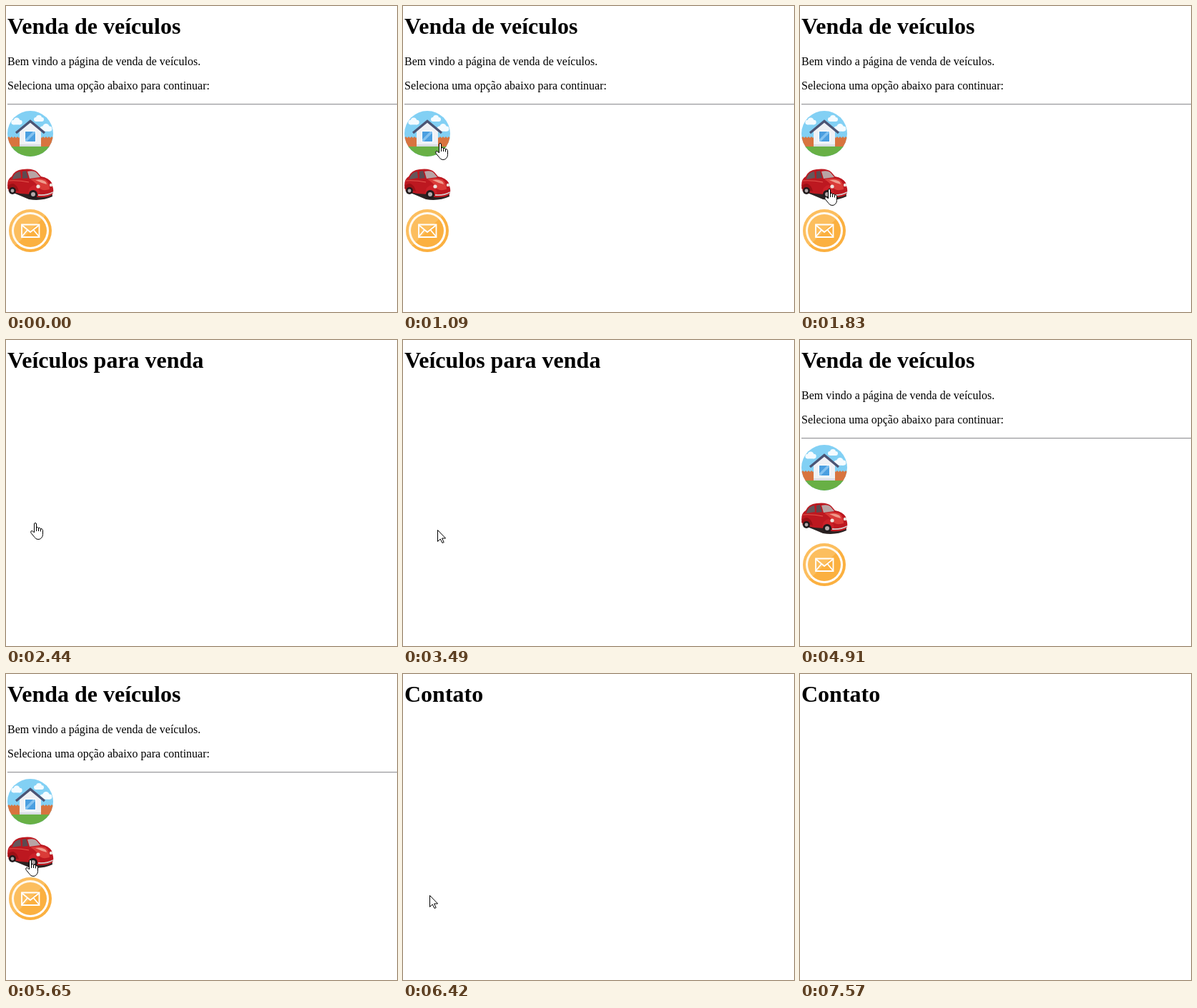
An HTML page with a canvas that plays this animation: 547x429 px, repeating every 8000 ms.

```html
<!DOCTYPE html>
<html lang="pt">
<head>
<meta charset="utf-8">
<title>Venda de veículos</title>
<style>
  html, body { margin: 0; width: 100%; height: 100%; overflow: hidden; background: #fff; }
  body { position: relative; color: #000; font-family: "Liberation Serif", "Times New Roman", serif; }
  canvas { position: absolute; left: 0; top: 0; }
  h1, p { position: absolute; left: 2px; margin: 0; white-space: nowrap; }
  h1 { top: 10px; font: bold 32px/36px "Liberation Serif", "Times New Roman", serif; }
  p { top: 69px; font-size: 16px; line-height: 17px; }
  p + p { top: 103px; }
</style>
</head>
<body>
<section id="home">
  <h1>Venda de veículos</h1>
  <p>Bem vindo a página de venda de veículos.</p>
  <p>Seleciona uma opção abaixo para continuar:</p>
</section>
<section id="cars" hidden><h1>Veículos para venda</h1></section>
<section id="contact" hidden><h1>Contato</h1></section>
<canvas id="stage" width="547" height="429"></canvas>
<script>
const LOOP = 8000;
const ctx = document.getElementById('stage').getContext('2d');
const pages = ['home', 'cars', 'contact'].map(id => document.getElementById(id));

// Pointer moves: start, end, number of steps, points the tip passes
const moves = [
  [390, 450, 2, [[325, 401], [322, 394]]],
  [600, 1370, 12, [[328, 392], [262, 340], [130, 240], [58, 191], [41, 222], [39, 258]]],
  [1440, 1440, 1, [[39, 260]]],
  [1700, 1830, 2, [[39, 258], [40, 256]]],
  [2700, 2830, 3, [[43, 261], [48, 270]]],
  [3490, 4110, 10, [[48, 266], [54, 220], [70, 110], [84, 20], [86, -30]]],
  [5110, 5850, 12, [[12, 0], [15, 75], [25, 185], [33, 266], [35, 303]]],
  [5920, 5990, 2, [[36, 306], [37, 309]]],
  [6420, 6420, 1, [[37, 310]]],
  [7020, 7570, 9, [[37, 306], [32, 250], [25, 140], [24, 30], [23, -30]]]
];

function shape(d, fill, stroke, width = 1) {
  const path = new Path2D(d);
  if (fill) { ctx.fillStyle = fill; ctx.fill(path); }
  if (stroke) { ctx.strokeStyle = stroke; ctx.lineWidth = width; ctx.stroke(path); }
}

function disc(x, y, r, fill) {
  ctx.beginPath();
  ctx.arc(x, y, r, 0, Math.PI * 2);
  ctx.fillStyle = fill;
  ctx.fill();
}

function box(x, y, w, h, fill) {
  ctx.fillStyle = fill;
  ctx.fillRect(x, y, w, h);
}

function cloud(x, y, s) {
  disc(x - 4 * s, y + s, 3 * s, '#f4fbff');
  disc(x, y - s, 4 * s, '#f4fbff');
  disc(x + 4 * s, y + s, 3 * s, '#f4fbff');
  box(x - 4 * s, y, 8 * s, 4 * s, '#f4fbff');
}

function drawHouse() {
  ctx.save();
  ctx.beginPath();
  ctx.arc(34, 179, 32, 0, Math.PI * 2);
  ctx.clip();
  box(2, 147, 64, 64, '#82d0f4');
  cloud(15, 162, 1.1);
  cloud(46, 158, 1);
  cloud(56, 171, 1.2);
  for (let x = 2; x < 66; x += 4) {
    shape(`M${x} 199V185l2-2 2 2v14z`, x % 8 ? '#d8743f' : '#c8643a');
  }
  box(2, 197, 64, 14, '#68b045');
  shape('M19 197V175L34 162 49 175V197Z', '#eff1f5');
  box(19, 194, 30, 3, '#d9dde5');
  shape('M14 178L34 161.5 54 178', null, '#4b5474', 3.4);
  box(26, 175, 16, 16, '#fff');
  box(27, 176, 14, 14, '#4b9fe0');
  shape('M27 187L38 176H41V178L29 190H27Z', '#83c2f0');
  ctx.restore();
}

function drawCar() {
  shape('M3 259Q18 265 32 271Q50 274 65 267L64 260 20 252Z', '#2b2222');
  shape('M2 252Q2 242 8 239Q12 230 23 229Q38 227 44 233L49 239Q60 241 64 248L66 256Q67 262 64 265Q57 269 44 268L34 264 20 263 4 260Z', '#bd1820');
  shape('M10 239Q13 233 20 232L21 241 9 243Z', '#66565a');
  shape('M23 232L28 231 31 241 23 242Z', '#5c4a50');
  shape('M30 232Q39 230 43 234L48 240Q40 241 33 242Z', '#b8a5a5');
  shape('M34 243Q46 240 55 243Q61 248 61 257Q51 260 46 255Q42 247 34 243Z', '#da3b38');
  shape('M41 244Q51 242 56 247L57 250Q49 248 41 244Z', '#f09b8d');
  shape('M4 245Q17 244 32 247', null, '#e4574f', 1.2);
  shape('M2 256Q3 249 10 249Q16 251 18 260Z', '#9c1016');
  shape('M31 263Q32 252 40 251Q46 253 48 264Z', '#cc2028');
  disc(9, 259, 5, '#211b1d');
  disc(9, 259, 2.4, '#b4aaab');
  disc(38, 264, 6, '#211b1d');
  disc(38, 264, 3, '#b4aaab');
  disc(45, 253, 2.6, '#eee5df');
  disc(63, 251, 2.2, '#eee5df');
  shape('M45 265Q57 266 66 261', null, '#d5cccc', 1.8);
}

function drawMail() {
  disc(34, 315, 30, '#fbb040');
  disc(34, 315, 26, '#fff');
  disc(34, 315, 23, '#fbb040');
  ctx.save();
  ctx.beginPath();
  ctx.arc(34, 315, 30, 0, Math.PI * 2);
  ctx.clip();
  shape('M4 285H64L4 345Z', 'rgba(255,230,185,.25)');
  ctx.restore();
  shape('M22 306.5H46.5V324H22Z', null, '#fff', 1.8);
  shape('M22 307L34 317 46.5 307M22 323.5L30 314M46.5 323.5L38.5 314', null, '#fff', 1.8);
}

function drawHome() {
  box(2, 137, 545, 1, '#9a9a9a');
  box(2, 138, 545, 1, '#e4e4ea');
  drawHouse();
  drawCar();
  drawMail();
}

function drawArrow() {
  shape('M.5.5V16.5L4.2 13 7 18.5 9.2 17.6 6.6 12H11.6Z', '#fff', '#000');
}

function drawHand() {
  ctx.translate(-6, 0);
  shape('M5.5 2Q5.5.5 7 .5Q8.5.5 8.5 2V7Q10.5 5.6 11.5 7.6Q13.4 6.6 14.5 8.6Q16.6 8 17.5 10.5V16.5Q17.5 19.5 15.5 21.5Q14 23.5 11 23.5Q7.5 23.5 6 20.5L1 14.5Q0 11.5 2.2 11.5Q3.8 11.8 5.5 14Z', '#fff', '#000');
  shape('M8.5 7V12M11.5 7.6V12M14.5 8.6V12.5', null, '#000');
}

function curve(a, b, c, d, s) {
  return b + s / 2 * (c - a + s * (2 * a - 5 * b + 4 * c - d + s * (3 * (b - c) + d - a)));
}

function along(pts, u) {
  const last = pts.length - 1;
  const at = i => pts[Math.max(0, Math.min(last, i))];
  const i = Math.min(Math.floor(u * last), Math.max(0, last - 1));
  const near = [at(i - 1), at(i), at(i + 1), at(i + 2)];
  return [0, 1].map(axis => Math.round(curve(...near.map(p => p[axis]), u * last - i)));
}

function pointerAt(t) {
  const move = moves.filter(m => m[0] <= t).pop();
  if (!move) return null;
  const [start, end, steps, pts] = move;
  if (steps === 1) return pts[0];
  const k = Math.floor((t - start) / (end - start) * (steps - 1) + 0.05);
  return along(pts, Math.min(k / (steps - 1), 1));
}

function overLink(x, y) {
  return x >= 2 && x < 66 && [147, 215, 283].some(top => y >= top && y < top + 64);
}

function drawPointer(t) {
  const tip = pointerAt(t);
  if (!tip) return;
  const linksLive = t < 2700 || (t >= 4910 && t < 6420);
  ctx.save();
  ctx.translate(...tip);
  if (linksLive && overLink(...tip)) drawHand();
  else drawArrow();
  ctx.restore();
}

function pageAt(t) {
  if (t >= 6280) return 2;
  return t >= 2230 && t < 4910 ? 1 : 0;
}

function render(t) {
  const page = pageAt(t);
  pages.forEach((el, i) => { el.hidden = i !== page; });
  ctx.clearRect(0, 0, 547, 429);
  if (page === 0) drawHome();
  drawPointer(t);
}

let begin;
function tick(now) {
  begin ??= now;
  render((now - begin) % LOOP);
  requestAnimationFrame(tick);
}
render(0);
requestAnimationFrame(tick);
</script>
</body>
</html>
```
